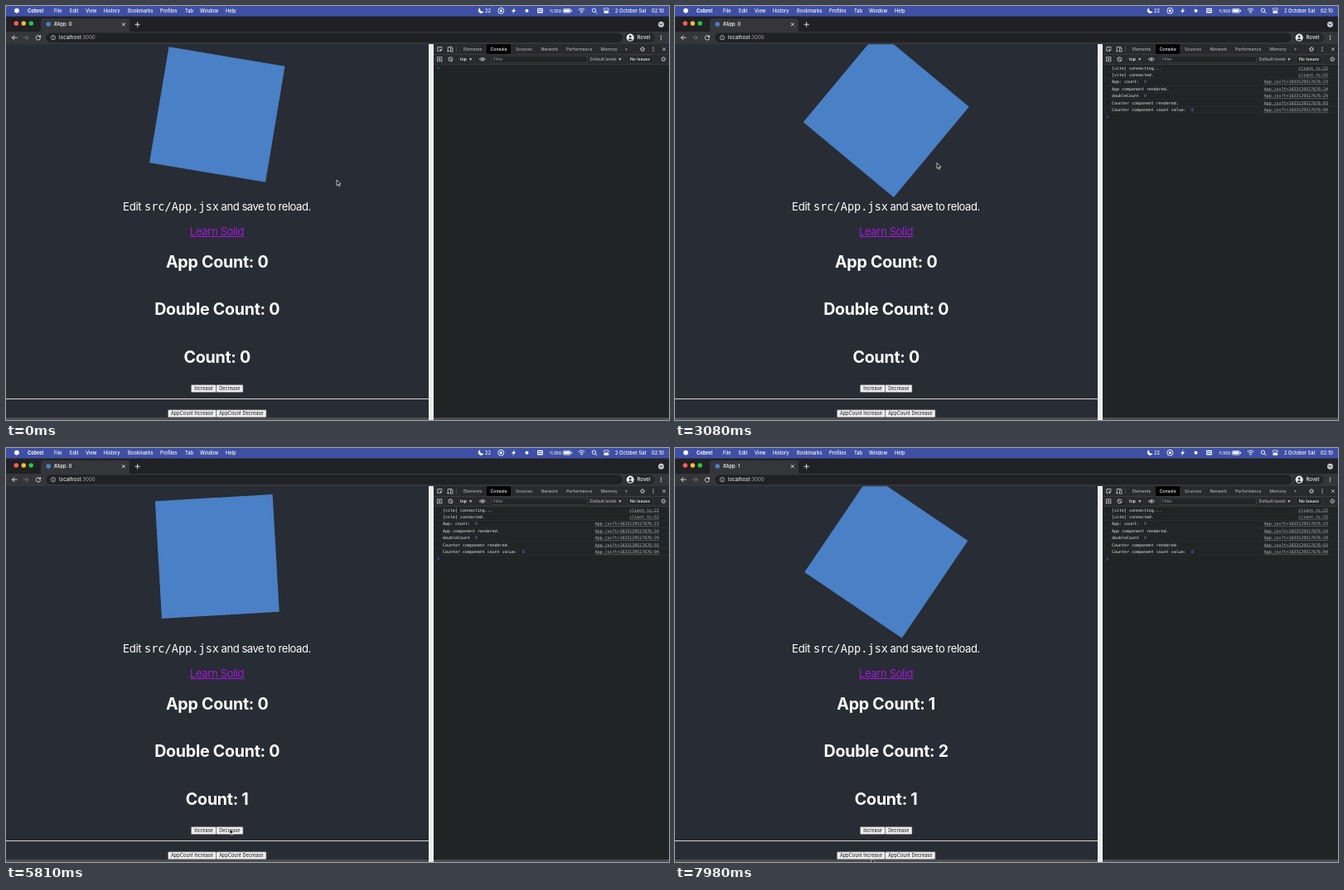
An HTML page for the animation above (8 s loop, 800 by 500 pixels).

```html
<!DOCTYPE html>
<html lang="en">
<head>
<meta charset="utf-8">
<title>Counter demo</title>
<style>
html, body { margin: 0; width: 100%; height: 100%; overflow: hidden; background: #202425; }
svg { display: block; width: 800px; height: 500px; }
text { font-family: Inter, "Open Sans", sans-serif; white-space: pre; }
.mono { font-family: "DejaVu Sans Mono", monospace; }
.icon { fill: none; stroke-width: .9; stroke-linecap: round; stroke-linejoin: round; }
</style>
</head>
<body>
<svg id="stage" viewBox="0 0 800 500"></svg>
<script>
const LOOP = 8000, STEP = 70;
const RELOAD = 1930, LOGS = 2030, COUNT = 4340, APP = 7700;
const SPIN = 17.2 / 1000, TILT = 20;
const BLUE = '#4a80c6', MENU = '#3f50a4', PANEL = '#202425';

const rect = (x, y, w, h, fill, more = '') =>
  `<rect x="${x}" y="${y}" width="${w}" height="${h}" fill="${fill}" ${more}/>`;
const dot = (x, y, r, fill, more = '') =>
  `<circle cx="${x}" cy="${y}" r="${r}" fill="${fill}" ${more}/>`;
const text = (x, y, str, size, fill, more = '') =>
  `<text x="${x}" y="${y}" font-size="${size}" fill="${fill}" ${more}>${str}</text>`;
const mono = (x, y, str, size, fill, more = '') =>
  text(x, y, str, size, fill, `class="mono" ${more}`);
const icon = (d, color = '#e8eaed', more = '') =>
  `<path class="icon" d="${d}" stroke="${color}" ${more}/>`;
const ring = (x, y, r, color, more = '') =>
  dot(x, y, r, 'none', `stroke="${color}" stroke-width=".9" ${more}`);
const row = (items, y, size, fill, more = '') =>
  items.map(([x, s]) => text(x, y, s, size, fill, more)).join('');
const dots = (x, y, color) =>
  [-2.2, 0, 2.2].map(d => dot(x, y + d, .7, color)).join('');
const gear = (x, y) =>
  ring(x, y, 1.7, '#c4c8cc') + ring(x, y, 2.6, '#c4c8cc', 'stroke-dasharray="1 1.04"');
const MEDIUM = 'font-weight="500"';

function page() {
  const heading = (id, y) =>
    text(254.7, y, '', 19.7, '#fff', `id="${id}" font-weight="700" letter-spacing="-.3" text-anchor="middle"`);
  const button = (x, y, w, label) =>
    rect(x, y, w, 9, '#efefef', 'stroke="#6f7175" stroke-width=".6" rx=".8"') +
    text(x + w / 2, y + 6.5, label, 5.6, '#111', 'text-anchor="middle"');
  const body = 'letter-spacing="-.5"';
  return rect(0, 46, 510, 454, '#282c34') +
    rect(-71, -71, 142, 142, BLUE, 'id="logo"') +
    text(141, 247.3, 'Edit', 13.2, '#fff', 'letter-spacing="-.3"') +
    mono(167, 247.3, 'src/App.jsx', 13.6, '#fff') +
    text(259.6, 247.3, 'and save to reload.', 13.1, '#fff', body) +
    text(222, 276.8, 'Learn Solid', 13, '#a418dc', 'letter-spacing="-.36"') +
    rect(222, 278, 65.5, 1, '#a418dc') +
    heading('app', 316) + heading('double', 373) + heading('count', 430.5) +
    button(223.5, 457.6, 30, 'Increase') + button(253.8, 457.6, 32.2, 'Decrease') +
    rect(0, 474, 510, 1, '#d4d5d7') +
    button(195.5, 487.8, 58, 'AppCount Increase') + button(253.8, 487.8, 60.2, 'AppCount Decrease');
}

function menuBar() {
  const white = '#fff';
  return rect(0, 0, 800, 13, MENU) +
    dot(13, 5.6, 2.9, white) +
    text(26, 7.8, 'Cobrel', 5.9, white, 'font-weight="700"') +
    row([[58, 'File'], [77, 'Edit'], [96, 'View'], [118, 'History'], [147, 'Bookmarks'],
      [186, 'Profiles'], [216, 'Tab'], [234, 'Window'], [265, 'Help']], 7.8, 5.7, white, MEDIUM) +
    '<path d="M571.6 2.6A3.2 3.2 0 1 0 576 7A3.7 3.7 0 0 1 571.6 2.6Z" fill="#fff" stroke="#fff" stroke-width=".5"/>' +
    row([[578, '22'], [735, '2 October Sat'], [779, '02:10']], 7.8, 5.7, white, MEDIUM) +
    text(656, 7.8, '%100', 5.2, white, MEDIUM) +
    ring(597.3, 5.7, 3.5, white) + rect(595.9, 4.3, 2.8, 2.8, white) +
    '<path d="M613.8 1.9L610 6.4H612.4L611.2 9.6L615.2 5H612.8Z" fill="#fff"/>' +
    dot(628.5, 5.7, 2, white) +
    rect(641, 2.8, 7, 5.6, white, 'rx=".8"') +
    icon('M642 4.5H647M642 6.5H647', MENU) +
    rect(672.3, 3.5, 9, 4.6, 'none', 'rx="1" stroke="#fff" stroke-width=".7"') +
    rect(673.2, 4.3, 7.2, 3, white) + rect(682, 4.8, .9, 2, white) +
    icon('M691 4.3Q694.5 1.5 698 4.3M692.4 5.9Q694.5 4.2 696.6 5.9', white) + dot(694.5, 7.7, .9, white) +
    ring(709.5, 5.2, 2.2, white) + icon('M711.2 6.9L713 8.7', white) +
    rect(721.2, 2.8, 6.2, 2.5, 'none', 'rx="1.25" stroke="#fff" stroke-width=".7"') +
    rect(721.2, 6.2, 6.2, 2.5, white, 'rx="1.25"');
}

function browserBars() {
  const light = '#e8eaed';
  return rect(0, 12.5, 800, 19, '#202124') +
    ['#ff5f57', '#febc2e', '#28c840'].map((c, i) => dot(12.3 + 9 * i, 21, 2.7, c)).join('') +
    '<path d="M40 31.5Q42 31.5 42 29V18Q42 15 45 15H146Q149 15 149 18V29Q149 31.5 151 31.5Z" fill="#35363a"/>' +
    dot(51.2, 22, 2.8, BLUE, 'id="fav"') +
    text(58, 24.2, '', 5.6, '#fff', `id="tab" ${MEDIUM}`) +
    icon('M140.2 20.6L143.4 23.8M143.4 20.6L140.2 23.8') +
    icon('M156 22.3H161.4M158.7 19.6V25') +
    dot(790.5, 22.3, 3.5, '#c5c8cc') + icon('M789 21.6L790.5 23.1L792 21.6', '#202124') +
    rect(0, 31, 800, 15.2, '#35363a') +
    icon('M13 38.2H7.6M10 35.6L7.4 38.2L10 40.8') +
    icon('M21.4 38.2H26.8M24.4 35.6L27 38.2L24.4 40.8', '#77797d') +
    dot(38.8, 38.2, 6, '#54565a', 'id="hover"') +
    icon('M41.2 36.9A2.7 2.7 0 1 0 41.5 39.2') + '<path d="M42 34.9V37.7H39.2Z" fill="#e8eaed"/>' +
    rect(48.5, 32.6, 695.5, 11.4, '#202124', 'rx="5.7"') +
    ring(57, 38.2, 2.7, '#a3a7ac') + icon('M57 38V39.5M57 36.7V36.8', '#a3a7ac') +
    text(64, 40.4, 'localhost<tspan fill="#9aa0a6">:3000</tspan>', 6.2, '#fff') +
    rect(746.5, 32.6, 36.5, 11.4, '#26272a', 'rx="5.7"') +
    dot(753.2, 38.2, 4.6, light) + dot(753.2, 36.9, 1.4, '#35363a') +
    '<path d="M750.5 40.8Q753.2 37.9 755.9 40.8Q753.2 42.8 750.5 40.8Z" fill="#35363a"/>' +
    text(761.5, 40.4, 'Rovel', 6.1, light, MEDIUM) + dots(790.5, 38.2, light);
}

function devTools() {
  const grey = '#c4c8cc';
  return rect(516, 46, 284, 454, PANEL) +
    rect(516, 46, 284, 24.3, '#292a2d') +
    rect(516, 58, 284, .6, '#45474b') + rect(516, 70, 284, .6, '#45474b') +
    icon('M523 54.4H520.8V49.6H526V51.4', grey) + `<path d="M523 51.6L527 53.2L525.2 53.8L524.6 55.4Z" fill="${grey}"/>` +
    icon('M533.2 54.4V49.6H538M532.6 54.6H535', grey) + rect(536.4, 51, 2.6, 4, 'none', `stroke="${grey}" stroke-width=".8"`) +
    rect(543, 48.5, .5, 7, '#55575b') +
    rect(580, 46.3, 29, 11.7, '#000') +
    row([[552, 'Elements'], [615, 'Sources'], [645.5, 'Network'], [676, 'Performance'], [717.5, 'Memory'], [747, '»']],
      54.1, 5.15, grey) +
    text(584.5, 54.1, 'Console', 5.15, '#fff', MEDIUM) +
    gear(768, 52.2) + dots(781, 52.2, grey) +
    icon('M792.3 50.5L795.7 53.9M795.7 50.5L792.3 53.9', grey) +
    rect(520.5, 61.8, 5.4, 5, 'none', `stroke="${grey}" stroke-width=".8"`) +
    `<path d="M522.3 62.8L525 64.3L522.3 65.8Z" fill="${grey}"/>` +
    ring(536.4, 64.3, 2.5, grey) + icon('M534.7 62.6L538.1 66', grey) +
    text(548, 66.1, 'top', 5.1, '#fff', MEDIUM) + `<path d="M559 63.2H562.4L560.7 65.9Z" fill="${grey}"/>` +
    icon('M571.6 64.3Q575 60.6 578.4 64.3Q575 68 571.6 64.3Z', grey) + dot(575, 64.3, 1.1, grey) +
    rect(585.5, 60.3, 116, 8, PANEL, 'stroke="#45474b" stroke-width=".6"') +
    text(588, 66.1, 'Filter', 5, '#9aa0a6') +
    text(704.8, 66.1, 'Default levels', 5, grey) + `<path d="M739.2 63.2H742.6L740.9 65.9Z" fill="${grey}"/>` +
    rect(749.5, 59.8, 31, 9, PANEL, 'rx="1" stroke="#45474b" stroke-width=".5"') +
    text(753, 66.1, 'No Issues', 5.1, '#fff', MEDIUM) +
    gear(793.3, 64.3) +
    `<g id="logs">${logs()}</g>` +
    icon('M521 -1.3L522.6 0L521 1.3', '#3f7be0', 'id="prompt"');
}

function logs() {
  const app = 'App.jsx?t=1633129517676:';
  const lines = [
    ['[vite] connecting...', 'client.ts:22'],
    ['[vite] connected.', 'client.ts:52'],
    ['App: count:', app + 23, 1],
    ['App component rendered.', app + 24],
    ['doubleCount', app + 29, 1],
    ['Counter component rendered.', app + 93],
    ['Counter component count value:', app + 94, 1]
  ];
  return lines.map(([msg, link, zero], i) => {
    const y = 76.6 + i * 8.4;
    const value = zero ? '  <tspan fill="#8078ee">0</tspan>' : '';
    return mono(527, y, msg + value, 4.98, '#e4e6e9') +
      mono(788, y, link, 4.95, '#b4b8bd', 'text-anchor="end"') +
      rect(788 - link.length * 2.98, y + .9, link.length * 2.98, .45, '#8c9095') +
      rect(517, y + 2.5, 283, .4, '#34363a');
  }).join('');
}

const stage = document.getElementById('stage');
stage.innerHTML = page() + menuBar() + browserBars() + devTools() +
  rect(0, 497, 800, 3, '#4b4d51') + rect(510, 46, 6, 454, '#ececed') +
  '<path id="pointer" d="M0 0V6.8L1.6 5.4L2.7 7.8L3.8 7.3L2.8 5H4.9Z" fill="#111" stroke="#fff" stroke-width=".7"/>';
const el = {};
stage.querySelectorAll('[id]').forEach(node => el[node.id] = node);

// Pointer stops: time, x, y
const path = [
  [0, 399, 210], [700, 399, 210], [1600, 39, 37.5], [2150, 39, 37.5], [3010, 316, 189.5],
  [3220, 316, 189.5], [3920, 236, 461], [4420, 236, 461], [4900, 269, 458.5],
  [5500, 269, 458.5], [6300, 271.5, 462], [6750, 271.5, 462], [7400, 237, 495.5], [LOOP, 237, 495.5]
];

function pointerAt(t) {
  const i = path.findIndex(p => p[0] > t);
  const [t0, x0, y0] = path[i - 1], [t1, x1, y1] = path[i];
  const u = (t - t0) / (t1 - t0), e = u * u * (3 - 2 * u);
  return [x0 + (x1 - x0) * e, y0 + (y1 - y0) * e];
}

function setText(node, str) {
  if (node.textContent !== str) node.textContent = str;
}

function draw(t) {
  const angle = TILT + (t < RELOAD ? 169.5 + t * SPIN : (t - RELOAD) * SPIN);
  el.logo.setAttribute('transform', `translate(254.8 131) rotate(${angle})`);

  const app = t >= APP ? 1 : 0;
  setText(el.tab, `#App: ${app}`);
  setText(el.app, `App Count: ${app}`);
  setText(el.double, `Double Count: ${app * 2}`);
  setText(el.count, `Count: ${t >= COUNT ? 1 : 0}`);

  const logged = t >= LOGS;
  el.logs.style.display = logged ? '' : 'none';
  el.prompt.setAttribute('transform', `translate(0 ${logged ? 133.8 : 75})`);

  const [x, y] = pointerAt(t);
  el.pointer.setAttribute('transform', `translate(${x} ${y})`);
  el.hover.style.display = Math.hypot(x - 38.8, y - 38.2) < 6 ? '' : 'none';
  el.fav.setAttribute('r', t >= 1820 && t < LOGS ? 1.8 : 2.8);
}

const start = performance.now();
function tick() {
  const t = (performance.now() - start) % LOOP;
  draw(Math.floor(t / STEP) * STEP);
  requestAnimationFrame(tick);
}
tick();
</script>
</body>
</html>
```
